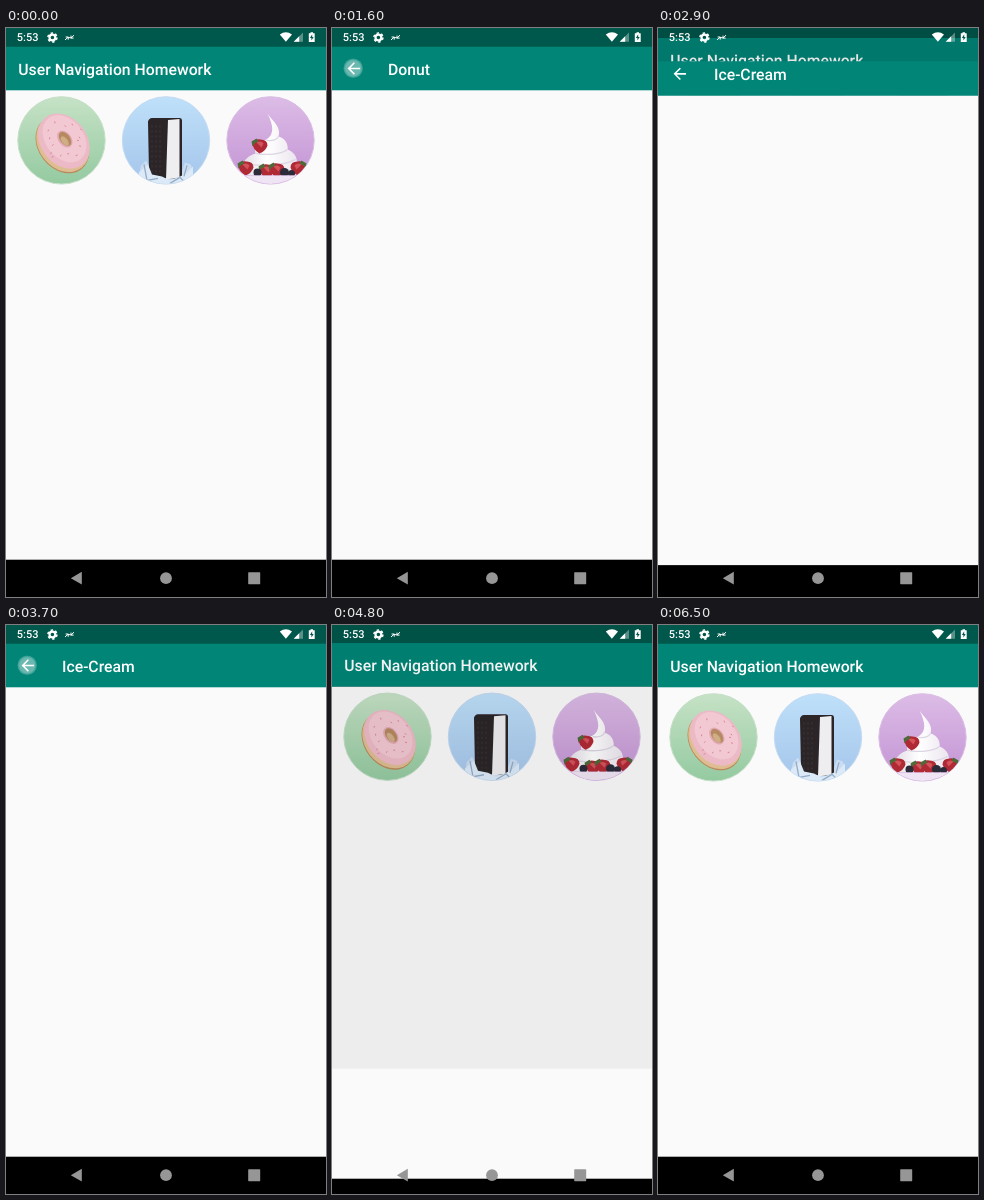
Recreate the animation shown at these times as an HTML page. Size 320x569 px, loop 6.9 s.

```html
<!DOCTYPE html>
<html lang="en">
<head>
<meta charset="utf-8">
<title>User Navigation Homework</title>
<style>
  html, body { margin: 0; width: 100%; height: 100%; overflow: hidden; background: #000; }
  svg { display: block; width: 100%; height: 100%; }
  text { font-family: Roboto, sans-serif; font-weight: 500; fill: #fff; text-rendering: geometricPrecision; }
  .title { font-size: 15.78px; }
  .clock { font-size: 11px; }
</style>
</head>
<body>
<svg viewBox="0 0 320 569">
  <defs>
    <linearGradient id="green" x2="0" y2="1"><stop stop-color="#c6e2c6"/><stop offset="1" stop-color="#94caa0"/></linearGradient>
    <linearGradient id="blue" x2="0" y2="1"><stop stop-color="#bfe0f9"/><stop offset="1" stop-color="#a5c5eb"/></linearGradient>
    <linearGradient id="purple" x2="0" y2="1"><stop stop-color="#dcbce6"/><stop offset="1" stop-color="#c393d4"/></linearGradient>
    <linearGradient id="cream" x2="1" y2="0"><stop stop-color="#e2dde6"/><stop offset=".45" stop-color="#fff"/><stop offset="1" stop-color="#ebe5ee"/></linearGradient>
    <radialGradient id="glow"><stop stop-color="#fff" stop-opacity=".42"/><stop offset=".75" stop-color="#fff" stop-opacity=".42"/><stop offset="1" stop-color="#fff" stop-opacity=".15"/></radialGradient>
    <clipPath id="disc"><circle r="43.5"/></clipPath>
    <clipPath id="reveal"><rect id="revealBox" width="320" height="569"/></clipPath>

    <g id="frame">
      <rect y="531" width="320" height="38"/>
      <rect y="62" width="320" height="469.7" fill="#fafafa"/>
      <rect y="18" width="320" height="44.3" fill="#008577"/>
      <rect width="320" height="18.7" fill="#00574b"/>
    </g>
    <g id="strawberry">
      <path d="M-7-3Q-4-7 1-6Q8-6 8 0Q6 6 0 8Q-7 4-7-3Z" fill="#b02a36"/>
      <path d="M-3-3Q1-5 4-2L2 2Z" fill="#d4535a"/>
      <path d="M-8-4L-3-7L-1-4L-5-2L-7 1Z" fill="#4d6b38"/>
    </g>
  </defs>

  <g id="home">
    <use href="#frame"/>
    <text class="title" x="12.3" y="46.8">User Navigation Homework</text>

    <g transform="translate(55.5 112.4)">
      <circle r="43.7" fill="url(#green)" stroke="#c5dfc8"/>
      <g transform="translate(1.5 2) rotate(-38)">
        <ellipse cx="-2" cy="1.5" rx="24" ry="31" fill="#b98a5c"/>
        <ellipse cx="-1" cy="1" rx="24" ry="30.5" fill="#dfbd92"/>
        <ellipse cx="1.5" cy="-.5" rx="23" ry="30" fill="#ecbac7"/>
        <ellipse cx="3.5" cy="-2" rx="19" ry="26" fill="#f2c8d2"/>
        <ellipse cx="3.5" cy="-1.5" rx="6.5" ry="9.5" fill="#e3aab6"/>
        <ellipse cx="3.8" cy="-1.5" rx="5" ry="8" fill="#b58a61"/>
        <ellipse cx="2.2" cy="0" rx="2.8" ry="5.5" fill="#cfae86"/>
      </g>
      <g id="sprinkles" stroke="#d98296" stroke-width="1" stroke-linecap="round"/>
    </g>

    <g transform="translate(160 112.4)">
      <circle r="43.7" fill="url(#blue)" stroke="#c3dbf3"/>
      <g clip-path="url(#disc)">
        <path d="M-25 25L-20 20L-16 27L-8 33H15L19 22L25 24L27 34L20 44H-22L-27 34Z" fill="#c9dcf1"/>
        <path d="M-18-19Q-17-22.5-14-22.5H14Q16-22.5 16-20V38H-13Q-17 37-17 33Z" fill="#2b2528"/>
        <path d="M2-20.5L13.5-21.5V37L0 39Z" fill="#eeeef1"/>
        <path d="M-14-15V32M-10-15V32M-6-15V32" stroke="#40373a" stroke-width="1" stroke-dasharray="2 3"/>
        <path d="M-27 32L-18 24L-14 34L-4 36L4 40L14 36L20 33L27 26V44H-27Z" fill="#dce9f7"/>
        <path d="M-22 24L-19 40L-8 38M4 43L14 37L20 43M21 25L18 36" fill="none" stroke="#95acc6" stroke-width="1.3"/>
      </g>
    </g>

    <g transform="translate(264.5 112.4)">
      <circle r="43.7" fill="url(#purple)" stroke="#dabde5"/>
      <g clip-path="url(#disc)">
        <path d="M-3-27C2-19 11-14 8-4C15-2 18 4 17 9C25 12 28 19 26 27V35H-28V27C-27 18-21 15-15 13C-17 6-11 1-4-1C4-6 3-15-3-27Z" fill="url(#cream)"/>
        <path d="M-4 0C2 1 7-1 8-4M-15 13C-4 15 11 14 17 9M-24 23C-8 27 14 25 25 19" fill="none" stroke="#dcd5e3" stroke-width="1.3"/>
        <use href="#strawberry" x="-11" y="5"/>
        <use href="#strawberry" x="-25" y="27"/>
        <use href="#strawberry" x="-4" y="30"/>
        <use href="#strawberry" x="6" y="29"/>
        <use href="#strawberry" transform="translate(28 27) scale(-1 1)"/>
        <g fill="#2c2b3a"><circle cx="-13" cy="32" r="4"/><circle cx="14" cy="32" r="4.5"/><circle cx="21" cy="33" r="3.5"/></g>
        <path d="M-36 35H36V44H-36Z" fill="#c898d7"/>
        <path d="M-28 35H29L23 44H-22Z" fill="#efe4f3"/>
      </g>
    </g>
  </g>

  <g id="detail">
    <use href="#frame"/>
    <circle id="ripple" cx="21.2" cy="40.3" fill="url(#glow)"/>
    <path transform="translate(12.46 31.1) scale(.7786)" d="M20 11H7.83l5.59-5.59L12 4l-8 8 8 8 1.41-1.41L7.83 13H20z" fill="#fff"/>
    <text class="title" id="detailTitle" x="56" y="46.8"></text>
  </g>

  <g id="system" fill="#fff">
    <text class="clock" x="10.8" y="13.2">5:53</text>
    <circle cx="46.4" cy="9.5" r="2.9" fill="none" stroke="#fff" stroke-width="2.2"/>
    <circle cx="46.4" cy="9.5" r="4.5" fill="none" stroke="#fff" stroke-width="1.5" stroke-dasharray="2.4 2.312"/>
    <path d="M59 12L62 9.2M59.6 9H62.2V11.7M68 7.2L65 10M65 7.6V10.1H67.6M62 9.3L65 10" fill="none" stroke="#fff" stroke-width="1"/>
    <path d="M273.8 6.5Q279.9 2.2 286 6.5L279.9 13.8Z"/>
    <path d="M297 4.5V13.8H287.7Z" opacity=".35"/>
    <path d="M293.2 8.3V13.8H287.7Z"/>
    <path d="M304.5 4.2H307V5.2H308.7V14H302.8V5.2H304.5Z"/>
    <path d="M306.2 6.3L303.9 10H305.4V12.6L307.7 8.9H306.2Z" fill="#00574b"/>
    <g fill="#969696">
      <path d="M64.8 550.2L75.8 543.8V556.6Z"/>
      <circle cx="160" cy="550.2" r="5.9"/>
      <rect x="242.2" y="544.2" width="12" height="12" rx=".6"/>
    </g>
  </g>
</svg>

<script>
const LOOP = 6900, TICK = 100, DURATION = 425, HEIGHT = 569;
const byId = id => document.getElementById(id);
const home = byId('home'), detail = byId('detail'), system = byId('system');
const ripple = byId('ripple'), detailTitle = byId('detailTitle'), revealBox = byId('revealBox');

// Screen changes; one without a title returns home. "from" delays its first visible picture.
const steps = [
  { at: -DURATION },
  { at: 340, title: 'Donut' },
  { at: 1876, press: 1600 },
  { at: 2690, title: 'Ice-Cream' },
  { at: 3945, press: 3700 },
  { at: 4740, title: 'Froyo' },
  { at: 6028, from: 6200, press: 5800 }
];

const clamp = v => Math.min(1, Math.max(0, v));
const bezier = (p, s) => {
  const r = 1 - s;
  return p[0] * r ** 3 + 3 * p[1] * s * r * r + 3 * p[2] * s * s * r + p[3] * s ** 3;
};

// Easing along joined cubic segments, each given as [xs, ys].
const pathEase = (...segments) => x => {
  const [xs, ys] = segments.find(([c]) => x <= c[3]);
  let low = 0, high = 1;
  for (let i = 0; i < 24; i++) {
    const mid = (low + high) / 2;
    if (bezier(xs, mid) < x) low = mid; else high = mid;
  }
  return bezier(ys, high);
};
const slowIn = pathEase([[0, .4, .2, 1], [0, 0, 1, 1]]);
const extraSlowIn = pathEase(
  [[0, .05, .133333, .166666], [0, 0, .06, .4]],
  [[.166666, .208333, .25, 1], [.4, .82, 1, 1]]
);

function place(screen, y, opacity, clipped) {
  screen.setAttribute('transform', `translate(0 ${y})`);
  screen.setAttribute('opacity', opacity);
  if (clipped) screen.setAttribute('clip-path', 'url(#reveal)');
  else screen.removeAttribute('clip-path');
}

function drawRipple(t) {
  const step = steps.find(s => s.press <= t && t < s.at + DURATION);
  const grown = step && t >= step.press + TICK;
  ripple.setAttribute('r', grown ? 15.5 : 9.8);
  ripple.setAttribute('opacity', step ? (grown ? .5 : 1) * (1 - clamp((t - step.at) / 200)) : 0);
}

function draw(t) {
  const index = steps.findLastIndex(s => (s.from ?? s.at) <= t);
  const step = steps[index], before = steps[Math.max(0, index - 1)];
  const progress = clamp((t - step.at) / DURATION);
  const moved = slowIn(progress);
  const entering = step.title ? detail : home;
  const leaving = step.title ? home : detail;

  detailTitle.textContent = step.title || before.title || '';
  leaving.style.display = progress < 1 ? '' : 'none';
  entering.style.display = '';
  if (leaving.nextElementSibling !== entering) system.before(leaving, entering);

  place(leaving, -.02 * HEIGHT * moved, 1 - .1 * clamp((t - step.at) / 117), false);
  place(entering, .041 * HEIGHT * (1 - moved), 1, progress < 1);
  revealBox.setAttribute('y', .959 * HEIGHT * (1 - extraSlowIn(progress)));
  drawRipple(t);
}

// Sprinkles spread around the icing by the golden angle.
byId('sprinkles').innerHTML = Array.from({ length: 15 }, (_, i) => {
  const angle = i * 2.4, radius = 13 + (i * 5) % 9;
  const x = 3 + radius * Math.cos(angle), y = radius * Math.sin(angle);
  return `<path d="M${x.toFixed(1)} ${y.toFixed(1)}l${Math.cos(i * 2).toFixed(1)} ${Math.sin(i * 2).toFixed(1)}"/>`;
}).join('');

const start = performance.now();
function tick() {
  const t = (performance.now() - start) % LOOP;
  draw(Math.floor(t / TICK) * TICK);
  requestAnimationFrame(tick);
}
tick();
</script>
</body>
</html>
```
